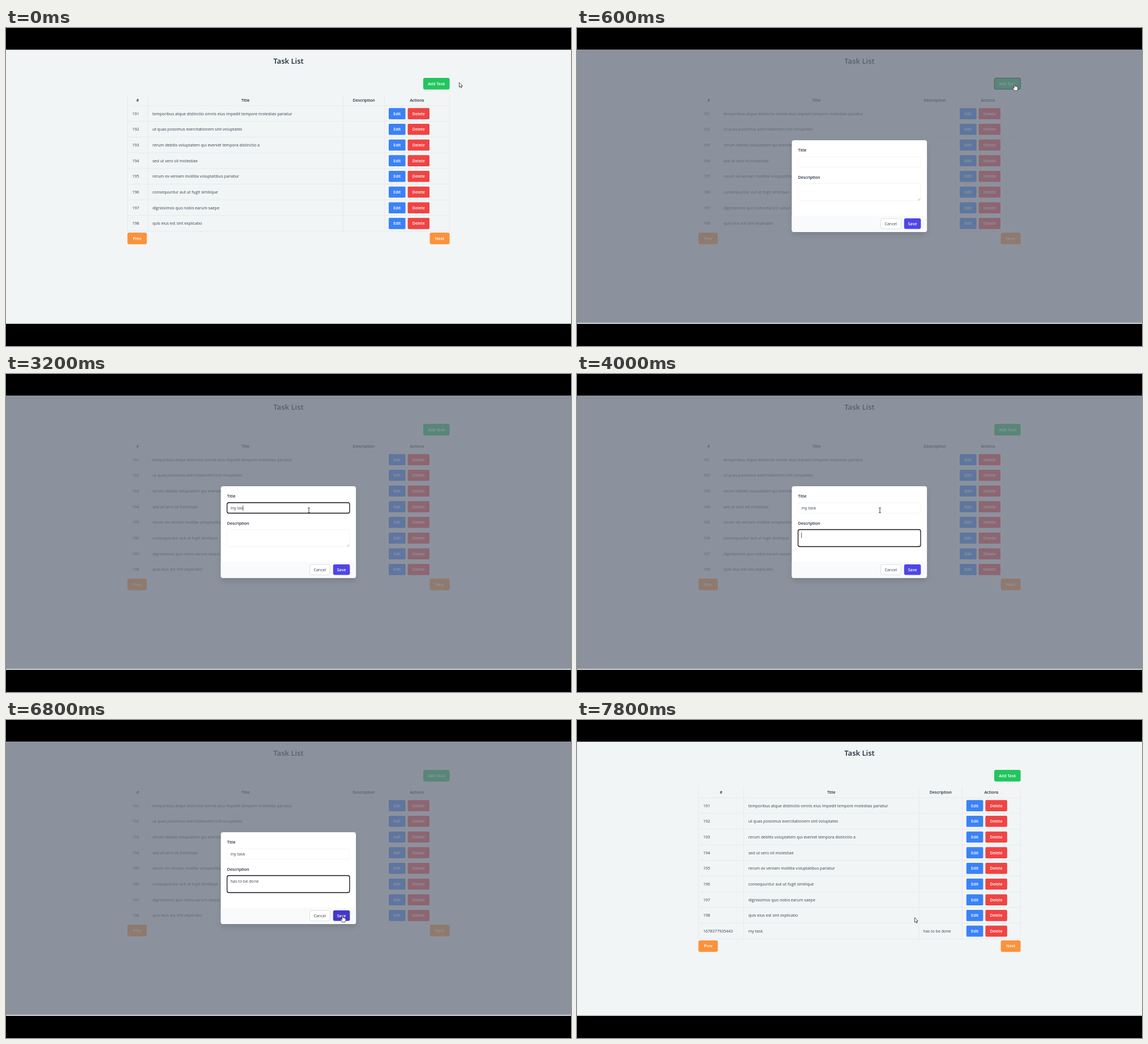
Recreate the animation shown at these times as an HTML page. Size 998 by 561 pixels, loop 8 s.

```html
<!DOCTYPE html>
<html lang="en">
<head>
<meta charset="utf-8">
<title>Task List</title>
<style>
html, body { margin: 0; width: 100%; height: 100%; overflow: hidden; background: #000; }
svg { display: block; width: 998px; height: 561px; font: 400 7.05px "Open Sans", "Noto Sans", sans-serif; }
text { fill: #374151; white-space: pre; }
.bold { font-weight: 600; fill: #1f2937; }
.medium { font-weight: 500; }
.mid { text-anchor: middle; }
.light { font-weight: 600; fill: #fff; }
.field { font-size: 7.2px; }
.grid { fill: none; stroke: #e6eaec; }
</style>
</head>
<body>
<svg id="stage" viewBox="0 0 998 561" xmlns="http://www.w3.org/2000/svg"></svg>
<script>
const LOOP = 8000, STEP = 200, ROW = 27.68;
const TITLES = [
  'temporibus atque distinctio omnis eius impedit tempore molestias pariatur',
  'ut quas possimus exercitationem sint voluptates',
  'rerum debitis voluptatem qui eveniet tempora distinctio a',
  'sed ut vero sit molestiae',
  'rerum ex veniam mollitia voluptatibus pariatur',
  'consequuntur aut ut fugit similique',
  'dignissimos quo nobis earum saepe',
  'quis eius est sint explicabo'
];
const TASKS = TITLES.map((title, i) => ({ id: 191 + i, title, note: '' }));
const ADDED = { id: 1678377935443, title: 'my task', note: 'has to be done' };

// y is the middle of the line
const text = (x, y, s, cls = '') => `<text x="${x}" y="${y + 2.5}" class="${cls}">${s}</text>`;
const rect = (x, y, w, h, fill, r = 0, more = '') =>
  `<rect x="${x}" y="${y}" width="${w}" height="${h}" rx="${r}" fill="${fill}" ${more}/>`;
const button = (x, y, w, h, fill, label, r = 1.6) =>
  rect(x, y, w, h, fill, r) + text(x + w / 2, y + h / 2, label, 'light mid');

function table(tasks, cols, edit) {
  const [left, c1, c2, c3, right] = cols;
  const top = 118, first = 137, bottom = first + ROW * tasks.length;
  let lines = '', out = '';
  for (const x of cols) lines += `M${x} ${top}V${bottom}`;
  for (let i = 0; i <= tasks.length; i++) lines += `M${left} ${first + ROW * i}H${right}`;
  out += `<path class="grid" d="${lines}"/>`;
  ['#', 'Title', 'Description', 'Actions'].forEach((s, i) => {
    out += text((cols[i] + cols[i + 1]) / 2, 127.3, s, 'bold mid');
  });
  tasks.forEach((task, i) => {
    const y = 151.1 + ROW * i;
    out += text(223, y, task.id) + text(c1 + 8.2, y, task.title) + text(c2 + 7.6, y, task.note);
    out += button(edit, y - 9.8, 29.6, 19.6, '#3b82f6', 'Edit');
    out += button(edit + 33.6, y - 9.8, 38.4, 19.6, '#ef4444', 'Delete');
  });
  out += button(214.5, bottom + 2.6, 34.2, 20.4, '#fb923c', 'Prev', 3);
  out += button(748.6, bottom + 2.6, 35, 20.4, '#fb923c', 'Next', 3);
  return out;
}

const box = (id, y, h) =>
  rect(390.5, y, 216.5, h, '#fff', 3, 'stroke="#f0f1f3" stroke-width=".8"') +
  rect(390.5, y, 216.5, h, 'none', 3, `id="${id}" stroke="#111318" stroke-width="1.3"`);

const modal =
  rect(379.5, 198, 238.6, 162, '#fff', 4, 'filter="url(#shadow)"') +
  `<path d="M379.5 331H618.1V356a4 4 0 0 1-4 4H383.5a4 4 0 0 1-4-4z" fill="#f9fafb"/>` +
  text(390.5, 215.7, 'Title', 'bold') + text(390.5, 263.6, 'Description', 'bold') +
  box('titleRing', 227, 18.5) + box('noteRing', 274.5, 30) +
  '<path d="M602.6 304l3.6-3.6M604.8 304.2l1.5-1.5" stroke="#8b8f96" stroke-width=".7"/>' +
  '<text id="title" class="field" x="396.4" y="239.4"></text>' +
  '<text id="note" class="field" x="396.4" y="287.3"></text>' +
  '<path id="caret" d="M0 0v9.6" stroke="#333" stroke-width=".8"/>' +
  rect(536.5, 336.2, 35.8, 18, '#fff', 3, 'stroke="#d8dbe0" stroke-width=".9"') +
  text(554.4, 345.2, 'Cancel', 'medium mid') +
  rect(577.8, 335.8, 29.6, 18.8, '#4f46e5', 3, 'id="save"') + text(592.6, 345.2, 'Save', 'light mid');

const cursors =
  '<path id="arrow" d="M0 0V8.4L2 6.7 3.4 9.7 4.7 9.1 3.4 6.2H5.9Z" fill="#fff" stroke="#222" stroke-width=".8"/>' +
  '<path id="hand" d="M-.9 6.4V.8Q0-.4.9.8V4Q2 3.3 2.7 4.3 3.7 3.8 4.3 4.8 5.6 4.6 5.6 6V8.4L4.4 11.4H-.6L-3.4 7.2Q-3.2 5.8-1.9 6.4L-.9 7.4Z" fill="#fff" stroke="#222" stroke-width=".8"/>' +
  '<path id="beam" d="M-2-4.2H-.5L0-3.8.5-4.2H2M0-3.8V3.8M-2 4.2H-.5L0 3.8.5 4.2H2" fill="none" stroke="#222" stroke-width=".9"/>';

document.getElementById('stage').innerHTML =
  `<defs><filter id="shadow" x="-20%" y="-20%" width="140%" height="150%">
    <feDropShadow dx="0" dy="5" stdDeviation="5" flood-color="#000" flood-opacity=".12"/></filter></defs>` +
  rect(0, 0, 998, 561, '#000') + rect(0, 38.3, 998, 483.7, '#f1f5f5') +
  '<text x="499" y="63.2" class="bold mid" style="font-size:13.1px">Task List</text>' +
  button(737, 88, 46.6, 20.4, '#22c55e', 'Add Task', 3) +
  rect(737.4, 88.4, 45.8, 19.6, 'none', 3, 'id="addRing" stroke="#1f2937" stroke-width="1.2"') +
  `<g id="before">${table(TASKS, [214.5, 250.5, 595.5, 668.5, 783.5], 676)}</g>` +
  `<g id="after">${table([...TASKS, ADDED], [214.5, 294.5, 604, 680.5, 783.5], 687.8)}</g>` +
  rect(0, 38.3, 998, 482.2, '#6b7280', 0, 'id="shade"') +
  rect(0, 520.2, 998, 1.6, '#cddad9') +
  `<g id="modal">${modal}</g>` + cursors;

const $ = id => document.getElementById(id);
const show = (id, on) => $(id).setAttribute('display', on ? 'inline' : 'none');

// Each table: [start ms, value...]
const POINTER = [
  [0, 'arrow', 800.5, 96], [200, 'hand', 773, 99], [800, 'arrow', 715, 145],
  [1000, 'arrow', 600, 212], [1200, 'beam', 535, 240.5], [6400, 'arrow', 556, 322],
  [6600, 'hand', 594.5, 345], [7000, 'arrow', 596.4, 348.5]
];
const TITLE = [[0, ''], [1800, 'm'], [2000, 'my'], [2200, 'my '], [2800, 'my t'],
  [3000, 'my ta'], [3200, 'my tas'], [3800, 'my task']];
const NOTE = [[0, ''], [4200, 'h'], [4400, 'ha'], [4600, 'has'], [4800, 'has t'], [5000, 'has to'],
  [5200, 'has to b'], [5400, 'has to be'], [5600, 'has to be do'], [5800, 'has to be done']];
const FADE = [[0, 0], [400, .5], [600, 1], [7000, 0]];
const FOCUS = [[0, ''], [400, 'add'], [1400, 'title'], [4000, 'note'], [7000, '']];

const at = (list, t) => list.filter(row => row[0] <= t).pop().slice(1);
const pen = document.createElement('canvas').getContext('2d');
pen.font = '7.2px "Open Sans", "Noto Sans", sans-serif';

function draw(t) {
  const [fade] = at(FADE, t), [focus] = at(FOCUS, t);
  const typed = { title: at(TITLE, t)[0], note: at(NOTE, t)[0] };
  show('before', t < 7000);
  show('after', t >= 7000);
  $('shade').setAttribute('opacity', fade * .75);
  $('modal').setAttribute('opacity', fade);
  for (const name of ['add', 'title', 'note']) show(name + 'Ring', focus === name);
  for (const name in typed) $(name).textContent = typed[name];
  const typing = focus in typed && t < 6400;
  show('caret', typing);
  if (typing) {
    const x = 396.6 + pen.measureText(typed[focus]).width;
    $('caret').setAttribute('transform', `translate(${x} ${focus === 'title' ? 231.8 : 279.6})`);
  }
  $('save').setAttribute('fill', t >= 6600 ? '#4338ca' : '#4f46e5');
  const [shape, x, y] = at(POINTER, t);
  for (const name of ['arrow', 'hand', 'beam']) show(name, name === shape);
  $(shape).setAttribute('transform', `translate(${x} ${y})`);
}

const start = performance.now();
let last = -1;
function tick() {
  const t = Math.floor((performance.now() - start) % LOOP / STEP) * STEP;
  if (t !== last) draw(last = t);
  requestAnimationFrame(tick);
}
tick();
</script>
</body>
</html>
```
